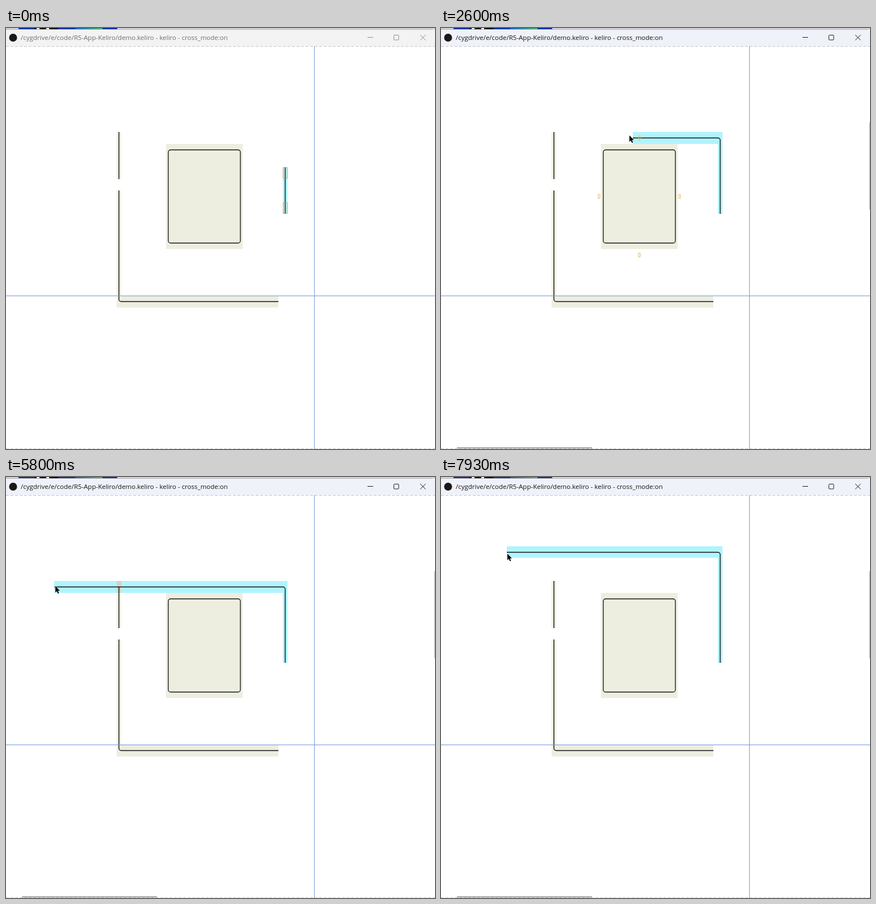
Write an HTML page with a canvas that moves like this. It is 756x741 px and loops after 8 s.

```html
<!DOCTYPE html>
<html lang="en">
<head>
<meta charset="utf-8">
<title>Diagram editor</title>
<style>
  html, body { margin: 0; width: 100%; height: 100%; overflow: hidden; background: #fff; }
  canvas { display: block; }
</style>
</head>
<body>
<canvas id="stage" width="756" height="741"></canvas>
<script>
const ctx = document.getElementById('stage').getContext('2d');
const LOOP = 8000, STEP = 200 / 3, DRAG_START = 1390, LAG = 40;
const CELL_W = 7.91, CELL_H = 20.55, LEFT = 195.4, TOP = 183.4;
const PAPER = '#edeee0', SELECTED = '#b0f4ff', INK = '#101010';

// Pointer moves: start time, end time, destination; it rests in between
const entry = [646, 135];
const moves = [
  [66, 600, 494, 256], [700, 1200, 490, 255], [1400, 1930, 490, 198],
  [1930, 3000, 259, 185], [3066, 3733, 211, 191], [3866, 4466, 198, 193],
  [4800, 5500, 87, 192], [6200, 7100, 345, 186], [7100, 7333, 324, 150],
  [7333, 7933, 117, 135]
];

const clamp = v => Math.min(1, Math.max(0, v));
const smooth = k => k * k * (3 - 2 * k);

function pointerAt(t) {
  let [x, y] = entry;
  for (const [start, end, toX, toY] of moves) {
    const k = smooth(clamp((t - start) / (end - start)));
    x += (toX - x) * k;
    y += (toY - y) * k;
  }
  return [x, y];
}

// Character grid, counted from the top of the left wall
const colX = c => Math.round(LEFT + c * CELL_W);
const rowY = r => Math.round(TOP + r * CELL_H);
const midX = c => colX(c) + 4;
const midY = r => Math.floor(TOP + (r + 0.5) * CELL_H) + 0.5;

function fill(color, x, y, w, h) {
  ctx.fillStyle = color;
  ctx.fillRect(x, y, w, h);
}

function cells(color, c0, r0, c1, r1) {
  fill(color, colX(c0), rowY(r0), colX(c1) - colX(c0), rowY(r1) - rowY(r0));
}

// Two points make a straight line, three a rounded elbow
function line(color, width, ...points) {
  ctx.strokeStyle = color;
  ctx.lineWidth = width;
  ctx.beginPath();
  ctx.moveTo(...points[0]);
  if (points.length === 3) ctx.arcTo(...points[1], ...points[2], 4);
  ctx.lineTo(...points.at(-1));
  ctx.stroke();
}

function outline(color, width, x, y, w, h, radius = 0) {
  ctx.strokeStyle = color;
  ctx.lineWidth = width;
  ctx.beginPath();
  ctx.roundRect(x, y, w, h, radius);
  ctx.stroke();
}

function drawTitleBar(active) {
  const glow = ctx.createLinearGradient(122, 0, 170, 0);
  glow.addColorStop(0, '#1464c8');
  glow.addColorStop(1, '#45b866');
  fill('#d4d4d8', 0, 0, 756, 3);
  fill('#0b2fa3', 22, 0, 174, 2);
  fill('#050505', 50, 0, 42, 2);
  for (const x of [54, 71]) fill('#fff', x, 0, 5, 2);
  fill(glow, 122, 0, 48, 2);

  ctx.fillStyle = active ? '#f0f2fa' : '#f3f3f3';
  ctx.beginPath();
  ctx.roundRect(0, 2, 756, 30, [0, 5, 0, 0]);
  ctx.fill();
  line('#b4b4b8', 1, [0, 2.5], [752, 2.5]);

  ctx.fillStyle = '#1c1817';
  ctx.beginPath();
  ctx.arc(12.5, 17, 7, 0, 7);
  ctx.fill();

  ctx.font = '11.5px "Open Sans", sans-serif';
  ctx.fillStyle = active ? '#161616' : '#707070';
  ctx.fillText('/cygdrive/e/code/R5-App-Keliro/demo.keliro - keliro - cross_mode:on', 26, 21);

  const icon = active ? '#1a1a1a' : '#8c8c8c';
  line(icon, 1, [637, 16.5], [647, 16.5]);
  outline(icon, 1, 683.5, 12.5, 8.5, 8.5, 1);
  line(icon, 1, [730, 12], [739.5, 21.5]);
  line(icon, 1, [739.5, 12], [730, 21.5]);
}

function drawShapes() {
  cells(PAPER, 0, 0, 1, 4);
  cells(PAPER, 0, 5, 1, 14);
  cells(PAPER, 0, 14, 36, 15);
  cells(PAPER, 11, 1, 28, 10);
  line(INK, 1.4, [midX(0), rowY(5)], [midX(0), midY(14)], [colX(36), midY(14)]);
  outline(INK, 1.3, midX(11), midY(1), midX(27) - midX(11), midY(9) - midY(1), 4);
}

function drawConnector(col, row, handles) {
  const crossing = row === 0 && col <= 0, corner = crossing && col === 0;
  cells(SELECTED, col, row, 38, row + 1);
  cells(SELECTED, 37, row + 1, 38, 7);
  if (crossing) cells('#d3d3c6', 0, 0, 1, 1);

  const bottom = [midX(37), rowY(7)], wallEnd = [midX(0), rowY(4)];
  const joint = [colX(1), midY(0)];
  if (col === 37) line(INK, 1.4, [midX(37), rowY(row)], bottom);
  else line(INK, 1.4, corner ? joint : [colX(col), midY(row)], [midX(37), midY(row)], bottom);

  if (corner) line(INK, 1.4, joint, [midX(0), midY(0)], wallEnd);
  else line(INK, 1.4, [midX(0), crossing ? midY(0) : rowY(0)], wallEnd);

  if (handles) {
    for (const r of [3, 6]) {
      fill('#e6e5cc', colX(37) + 1, rowY(r) + 1, 2, 19);
      outline('#a09f84', 1, colX(37) + 0.5, rowY(r) + 0.5, 7, 19);
    }
  }
}

function drawAnchors() {
  for (const [dx, dy] of [[0, -1], [0, 1], [-1, 0], [1, 0]])
    outline('#e9b765', 1, 348 + dx * 71, 293 + dy * 103, 3, 7);
}

function drawPointer(x, y) {
  const arrow = new Path2D('M0 0V11.2L2.6 8.9 4.4 13.2 6.3 12.4 4.5 8.2H8Z');
  ctx.save();
  ctx.translate(Math.round(x), Math.round(y));
  ctx.strokeStyle = '#fff';
  ctx.lineWidth = 1;
  ctx.stroke(arrow);
  ctx.fillStyle = '#000';
  ctx.fill(arrow);
  ctx.restore();
}

function drawGuides() {
  line('#7299dc', 1, [543.5, 32], [543.5, 741]);
  line('#7299dc', 1, [0, 471.5], [756, 471.5]);
  ctx.setLineDash([5, 3]);
  for (const y of [32.5, 740.5]) line('#c6c6c6', 1, [0, y], [756, y]);
  ctx.setLineDash([]);
}

function drawScrollbars(opacity) {
  ctx.globalAlpha = opacity;
  fill('#a3a3a3', 28, 738, 238, 2);
  fill('#a3a3a3', 755, 166, 1, 153);
  ctx.globalAlpha = 1;
}

function render(t) {
  const dragging = t >= DRAG_START;
  let col = 37, row = 3;
  if (dragging) {
    const [x, y] = pointerAt(t - LAG);
    col = Math.min(37, Math.floor((x - LEFT) / CELL_W));
    row = Math.floor((y - TOP) / CELL_H);
  }

  fill('#fff', 0, 0, 756, 741);
  drawTitleBar(dragging);
  drawShapes();
  drawConnector(col, row, !dragging);
  if (row === 0 && col >= 8 && col <= 30) drawAnchors();
  drawGuides();
  drawScrollbars(clamp((t - 30) / 200));
  if (t >= 60) drawPointer(...pointerAt(t));
}

function tick(now) {
  render(Math.floor((now % LOOP + 4) / STEP) * STEP % LOOP);
  requestAnimationFrame(tick);
}
requestAnimationFrame(tick);
</script>
</body>
</html>
```
